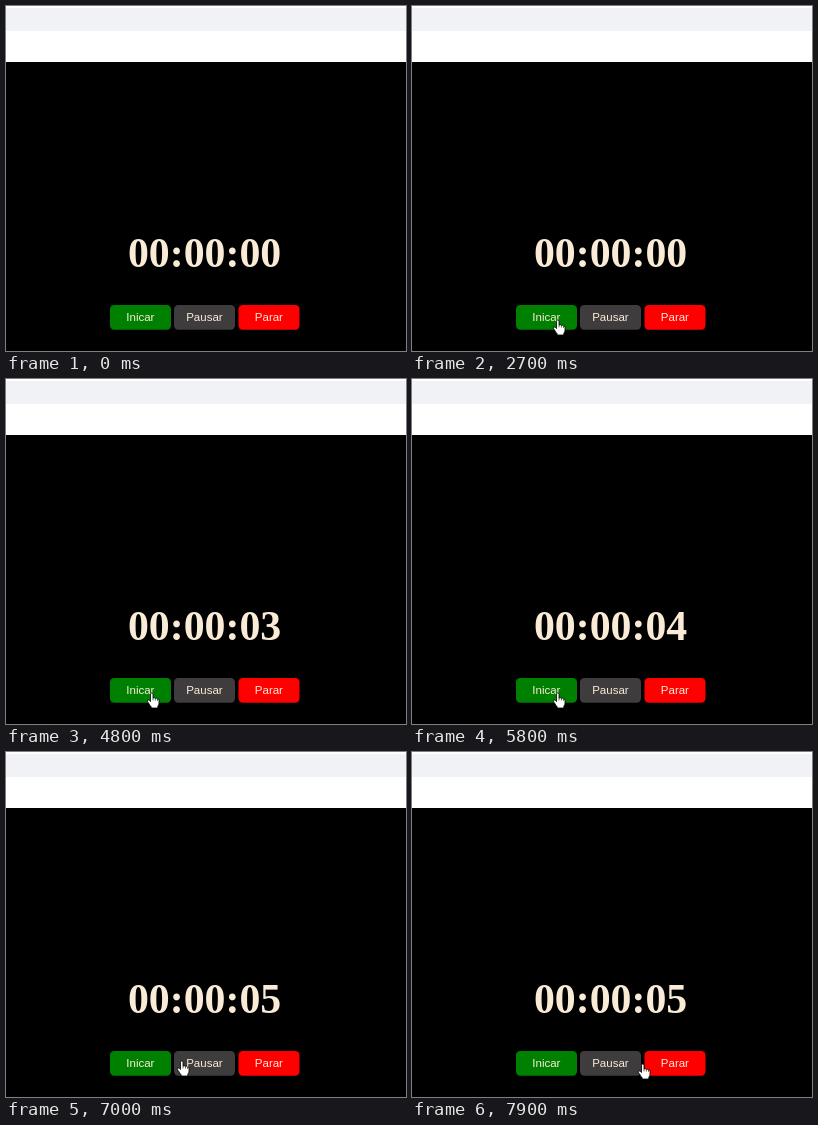
Recreate the animation shown at these times as an HTML page. Size 400 by 345 pixels, loop 8000 ms.

```html
<!DOCTYPE html>
<html lang="pt">
<head>
<meta charset="utf-8">
<title>Cronômetro</title>
<style>
  html, body { margin: 0; width: 100%; height: 100%; overflow: hidden; background: #000; }
  svg { display: block; width: 100%; height: 100%; }
  text { fill: #faebd7; text-anchor: middle; }
  #clock { font: bold 41.8px "Liberation Serif", "Times New Roman", serif; }
  .label { font: 11.5px "Liberation Sans", Arial, sans-serif; }
  .pointer { fill: #fff; stroke: #000; stroke-width: .8; stroke-linejoin: round; }
</style>
</head>
<body>
<svg viewBox="0 0 400 345">
  <rect width="400" height="345"/>
  <rect width="400" height="56" fill="#fff"/>
  <rect y="2" width="400" height="23" fill="#f0f2f5"/>
  <text id="clock" x="198.6" y="261">00:00:00</text>
  <g id="buttons"></g>
  <path id="arrow" class="pointer" d="M0 0V11.2L2.6 8.8L4.5 13L6.5 12.1L4.7 8H8.2Z"/>
  <g id="hand" class="pointer">
    <path d="M-1.5 1.2Q-1.5 0 -.3 0T1 1.2V5Q2.8 4.3 3.4 5.4Q5 4.8 5.5 6Q7 5.6 7 7.2V10.2Q7 12 5.8 13.2V15H-.8V13.8Q-2.4 12.2 -3.2 10.4L-4.7 8.2Q-5 6.9 -3.8 6.9Q-2.6 7.1 -1.5 8.6Z"/>
    <path d="M1 5V7.4M3.4 5.6V7.6M5.5 6.2V7.9" fill="none" stroke-width=".6"/>
  </g>
</svg>
<script>
const LOOP = 8000, STEP = 100;
const $ = id => document.getElementById(id);

const BUTTONS = [
  ['Inicar', 104, '#008000'],
  ['Pausar', 168, '#3e3c3d'],
  ['Parar', 232.5, '#ff0000'],
];
$('buttons').innerHTML = BUTTONS.map(([name, x, fill]) =>
  `<rect x="${x}" y="299" width="61" height="24.8" rx="4.2" fill="${fill}"/>
   <text class="label" x="${x + 30.4}" y="314.6">${name}</text>`).join('');

// time, x, y of the pointer's hot spot
const PATH = [
  [2200, 146.5, 331], [2400, 146.5, 323], [2600, 146, 315], [2700, 146, 314],
  [6500, 146, 314], [6700, 157, 313], [7000, 176, 309], [7300, 181, 307],
  [7500, 181, 307], [7700, 205, 308], [7900, 231, 312],
];

function pointerAt(t) {
  const i = PATH.findIndex(p => p[0] > t);
  if (i < 0) return PATH[PATH.length - 1].slice(1);
  const [t0, x0, y0] = PATH[i - 1], [t1, x1, y1] = PATH[i];
  const k = (t - t0) / (t1 - t0);
  return [x0 + (x1 - x0) * k, y0 + (y1 - y0) * k];
}

function place(el, shown, x, y) {
  el.style.display = shown ? '' : 'none';
  el.setAttribute('transform', `translate(${x} ${y})`);
}

function draw() {
  const t = Math.floor(performance.now() % LOOP / STEP) * STEP;
  const seconds = Math.min(5, Math.max(0, Math.floor((t - 1800) / 1000)));
  $('clock').textContent = `00:00:0${seconds}`;

  const visible = t >= PATH[0][0];
  const [x, y] = visible ? pointerAt(t) : [0, 0];
  const over = y < 324;
  place($('arrow'), visible && !over, x, y);
  place($('hand'), visible && over, x, y);
  requestAnimationFrame(draw);
}
draw();
</script>
</body>
</html>
```
